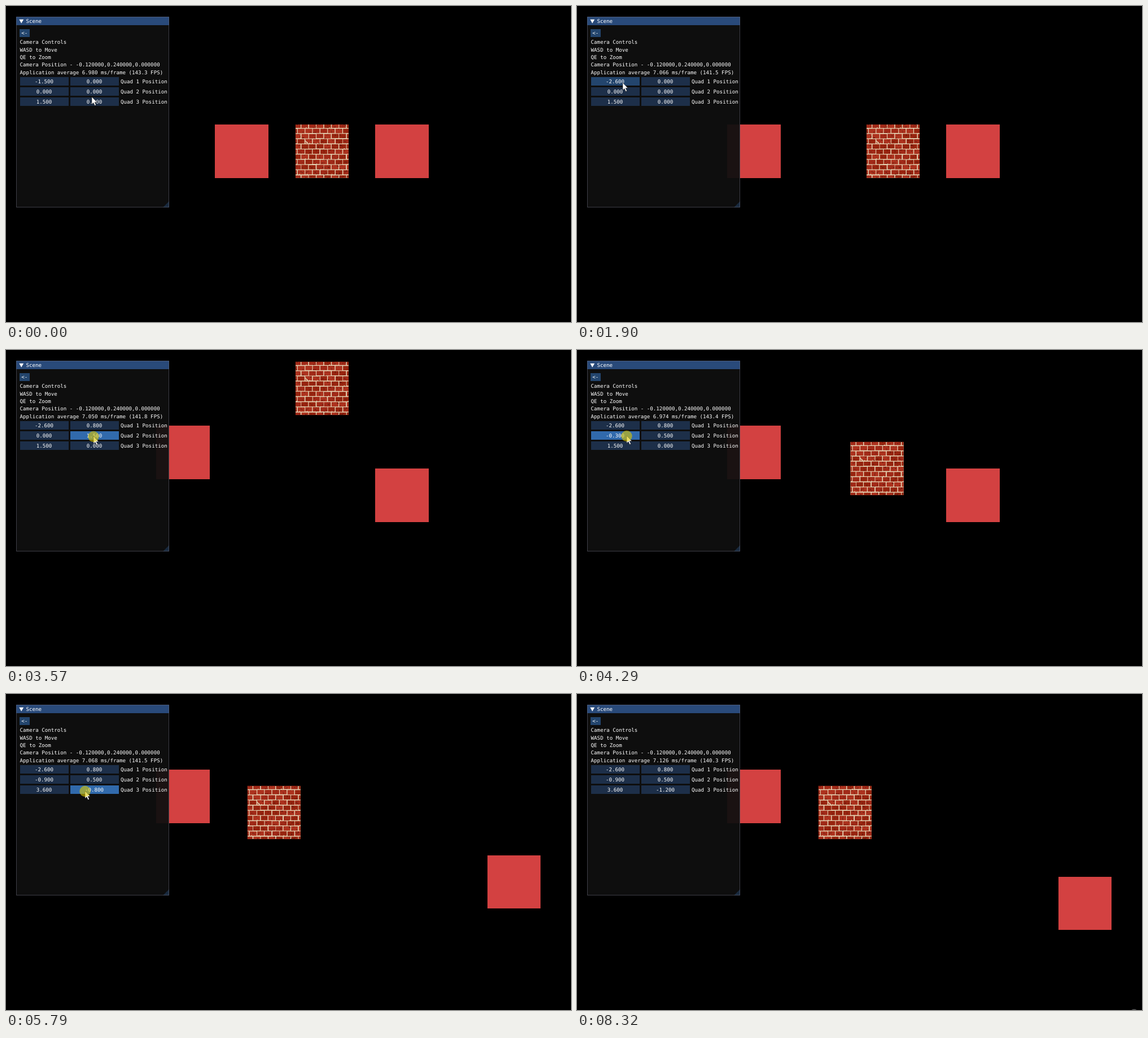
An HTML page that plays this animation: 1001x560 px, repeating every 8400 ms.

```html
<!DOCTYPE html>
<html lang="en">
<head>
<meta charset="utf-8">
<title>Scene</title>
<style>
  html, body { margin: 0; width: 100%; height: 100%; overflow: hidden; background: #000; }
  #stage { display: block; width: 1001px; height: 560px; }
  text {
    font: 9.17px "DejaVu Sans Mono", monospace;
    fill: #fff;
    white-space: pre;
    text-rendering: geometricPrecision;
  }
  .mid { text-anchor: middle; }
</style>
</head>
<body>
<svg id="stage" viewBox="0 0 1001 560"></svg>
<script>
const LOOP = 8400, STEPS = 106, UNIT = 94.67;
const stage = document.getElementById('stage');

function add(parent, tag, attrs, text) {
  const el = document.createElementNS('http://www.w3.org/2000/svg', tag);
  set(el, attrs);
  if (text !== undefined) el.textContent = text;
  parent.appendChild(el);
  return el;
}
function set(el, attrs) {
  for (const k in attrs) el.setAttribute(k, attrs[k]);
}
function box(parent, x, y, width, height, fill) {
  return add(parent, 'rect', { x, y, width, height, fill, 'shape-rendering': 'crispEdges' });
}
const label = (x, y, s, cls = '') => add(stage, 'text', { x, y, class: cls }, s);

// Step, x, y of the pointer tip
const POINTER = [
  [0, 152, 161], [4, 88, 138], [9, 85, 137], [11, 85, 137], [13, 92, 137],
  [15, 82, 137], [19, 74, 137], [21, 74, 137], [24, 81, 136], [27, 136, 138],
  [29, 136, 138], [32, 160, 138], [35, 145, 138], [36, 144, 138], [38, 144, 139],
  [40, 140, 153], [41, 140, 153], [44, 160, 153], [47, 145, 153], [49, 118, 152],
  [51, 91, 152], [52, 91, 152], [53, 88, 152], [54, 88, 152], [58, 82, 152],
  [60, 70, 170], [61, 70, 170], [62, 74, 170], [64, 74, 170], [68, 91, 171],
  [70, 148, 172], [71, 148, 172], [72, 140, 172], [73, 140, 172], [74, 138, 172],
  [75, 137, 172], [77, 137, 172], [78, 136, 172], [79, 136, 172], [81, 140, 110],
  [84, 48, 58], [85, 48, 56], [88, 600, 426], [91, 705, 556], [92, 705, 600]
];
const FRAME_MS = [
  [0, 6.980], [11, 7.125], [24, 7.066], [36, 7.126], [54, 6.974],
  [73, 7.068], [86, 7.130], [93, 7.160], [105, 7.126]
];
const HOLDS = [5, 64, 77, 94, 101];

const DRAGS = [
  { quad: 0, axis: 0, from: 10, to: 20 },
  { quad: 0, axis: 1, from: 29, to: 37 },
  { quad: 1, axis: 1, from: 41, to: 47 },
  { quad: 1, axis: 0, from: 52, to: 58 },
  { quad: 2, axis: 0, from: 61, to: 68 },
  { quad: 2, axis: 1, from: 71, to: 79 }
];
const START = [[-1.5, 0], [0, 0], [1.5, 0]];

function sample(table, step, col) {
  let i = 0;
  while (i < table.length - 1 && table[i + 1][0] <= step) i++;
  const a = table[i], b = table[i + 1];
  if (!b) return a[col];
  return a[col] + (b[col] - a[col]) * (step - a[0]) / (b[0] - a[0]);
}
const pointerX = step => sample(POINTER, step, 1);

// One pixel of dragging changes a value by 0.1
function valuesAt(step) {
  const v = START.map(p => p.slice());
  for (const d of DRAGS) {
    if (step < d.from) continue;
    const moved = pointerX(Math.min(step, d.to)) - pointerX(d.from);
    v[d.quad][d.axis] += 0.1 * Math.round(moved);
  }
  return v;
}

function makeBricks() {
  let seed = 11;
  const rnd = () => (seed = (seed * 16807) % 2147483647) / 2147483647;
  const size = 94.2, rowH = 9.17, brickW = 13.4;
  const g = add(stage, 'svg', { width: size, height: UNIT, overflow: 'hidden' });
  const paths = { '#a22a18': '', '#98240f': '', '#ad321e': '' };
  const shades = Object.keys(paths);
  let specks = '', chips = '';
  const rect = (x, y, w, h) =>
    `M${x.toFixed(1)} ${y.toFixed(1)}h${w.toFixed(1)}v${h.toFixed(1)}h${(-w).toFixed(1)}z`;

  box(g, 0, 0, size, UNIT, '#e5d5b5');
  for (let r = 0; r < 11; r++) {
    const top = 7.3 + (r - 1) * rowH;
    const left = (r % 2 ? 3.7 : 10.2) - brickW;
    for (let k = 0; k < 8; k++) {
      const x = left + k * brickW + rnd() * 0.5;
      const y = top + rnd() * 0.4;
      const shade = shades[Math.floor(rnd() * 3)];
      paths[shade] += rect(x, y, brickW - 1.1 - rnd() * 0.4, rowH - 1.2 - rnd() * 0.3);
      for (let n = 0; n < 4; n++) {
        const sx = x + rnd() * 11, sy = y + rnd() * 7;
        if (rnd() < 0.35 + sx / 160 + sy / 400) {
          specks += rect(sx, sy, 0.6 + rnd() * 1.6, 0.6 + rnd() * 0.6);
        }
      }
      if (rnd() < 0.15) chips += rect(x + rnd() * 11, y + 6.8, 1.4, 1.2);
    }
  }
  for (const fill of shades) add(g, 'path', { d: paths[fill], fill });
  add(g, 'path', { d: specks, fill: '#4d1109' });
  add(g, 'path', { d: chips + 'M17 27l2.5 3.5 2.5 1v2l-4-2z', fill: '#e5d5b5' });
  return g;
}

// Scene
const quads = [
  box(stage, 0, 0, UNIT, UNIT, '#d34141'),
  makeBricks(),
  box(stage, 0, 0, UNIT, UNIT, '#d34141')
];

// Panel
set(box(stage, 18, 19, 271, 338, '#0f0f0f'), { 'fill-opacity': 0.94 });
box(stage, 18, 19, 271, 15, '#294a7a');
add(stage, 'path', { d: 'M289 346V357H278z', fill: '#192a3e' });
add(stage, 'rect', {
  x: 18.5, y: 19.5, width: 270, height: 337, fill: 'none', stroke: '#6e6e80', 'stroke-opacity': 0.5
});
add(stage, 'path', { d: 'M23.3 23.8H31.2L27.2 30.7z', fill: '#fff' });
label(35.5, 30.3, 'Scene');
box(stage, 24, 41, 18, 14, '#23456d');
label(27.3, 51.4, '<-');
['Camera Controls', 'WASD to Move', 'QE to Zoom',
  'Camera Position - -0.120000,0.240000,0.000000'
].forEach((s, i) => label(24.6, 67.2 + i * 13.42, s));
const stats = label(24.6, 120.9, '');

const COLS = [24, 113], ROWS = [126, 144, 162], FIELD_W = 87, FIELD_H = 15;
const fields = [];
ROWS.forEach((y, quad) => {
  COLS.forEach((x, axis) => {
    const rect = box(stage, x + 0.5, y, FIELD_W - 0.9, FIELD_H, '#1d2f49');
    fields.push({ quad, axis, x, y, rect, text: label(x + 43.5, y + 10.9, '', 'mid') });
  });
  label(203, y + 10.9, `Quad ${quad + 1} Position`);
});

// Pointer
const pointer = add(stage, 'g', {});
add(pointer, 'path', {
  d: 'M0 0V13.2L3 10.4 5.3 15.6 7.5 14.6 5.2 9.6H9.2z',
  fill: '#fff', stroke: '#000', 'stroke-width': 0.5
});
const press = add(pointer, 'circle', { r: 9.7, cy: 0.5, fill: '#dcc800', 'fill-opacity': 0.6 });
const corner = add(stage, 'ellipse', { cx: 987, cy: 563, rx: 6, ry: 4.6, fill: '#5a5a5a' });

const show = (el, on) => el.setAttribute('visibility', on ? 'visible' : 'hidden');

function draw(step) {
  const x = pointerX(step), y = sample(POINTER, step, 2);
  const drag = DRAGS.find(d => step >= d.from && step <= d.to);
  const values = valuesAt(step);

  // The quads are drawn before the panel reads the pointer, so they lag one step.
  valuesAt(step - 1).forEach(([qx, qy], i) => {
    set(quads[i], { x: (i === 1 ? 512.9 : 512) + qx * UNIT, y: 210 - qy * UNIT });
  });

  for (const f of fields) {
    const active = drag && drag.quad === f.quad && drag.axis === f.axis;
    const hover = !drag && x >= f.x && x < f.x + FIELD_W && y >= f.y && y < f.y + FIELD_H;
    f.rect.setAttribute('fill', active ? '#316aac' : hover ? '#23456d' : '#1d2f49');
    f.text.textContent = values[f.quad][f.axis].toFixed(3);
  }

  const ms = sample(FRAME_MS, HOLDS.includes(step) ? step - 1 : step, 1);
  stats.textContent =
    `Application average ${ms.toFixed(3)} ms/frame (${(1000 / ms).toFixed(1)} FPS)`;

  pointer.setAttribute('transform', `translate(${x} ${y})`);
  show(press, drag);
  show(corner, step >= 104);
}

const origin = performance.now();
let last = -1;
function tick() {
  const t = (performance.now() - origin) % LOOP;
  const step = Math.min(STEPS - 1, Math.floor((t + 12) * STEPS / LOOP));
  if (step !== last) draw(last = step);
  requestAnimationFrame(tick);
}
tick();
</script>
</body>
</html>
```
